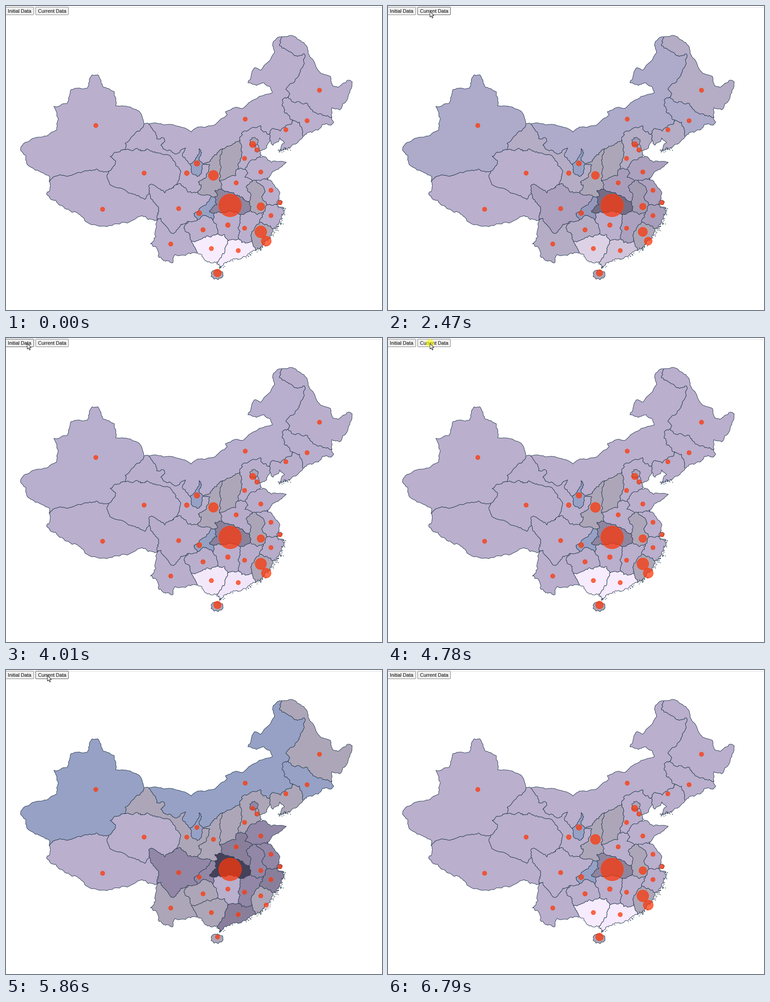
A matplotlib script that plays this animation: 833 px wide and 673 px high, repeating every 7.48 s.

```python
import numpy as np
import matplotlib.pyplot as plt
from matplotlib.animation import FuncAnimation
from matplotlib.colors import to_rgb
from matplotlib.patches import Circle, FancyBboxPatch, Polygon

W, H, DPI = 833, 673, 64
PX = 72 / DPI
LOOP, STEP = 7480, 40
LINE = "#2c4055"
LILAC, BLUE, GREY = "#baafcd", "#96a1c5", "#ada6b8"
MAUVE, DUSK, NIGHT, PALE = "#9287a6", "#897f9b", "#464059", "#f7ebfe"
BASE = 4.7  # resting bubble radius

rng = np.random.default_rng(7)
plt.rcParams["toolbar"] = "None"
fig = plt.figure(figsize=(W / DPI, H / DPI), dpi=DPI, facecolor="white")
ax = fig.add_axes([0, 0, 1, 1])
ax.set(xlim=(0, W), ylim=(H, 0))
ax.axis("off")

# ---- map: corners where borders meet, and a few bends between two corners ----
CORNERS = dict(
    a=(96, 389), b=(228, 366), c=(264, 318), d=(306, 261), e=(316, 261), f=(611, 68),
    g=(722, 246), h=(658, 289), i=(634, 252), j=(624, 202), k=(582, 284), l=(585, 297),
    m=(518, 297), n=(480, 316), o=(438, 350), p=(408, 351), q=(366, 405), r=(318, 415),
    s=(335, 474), t=(425, 413), u=(455, 422), v=(463, 423), w=(484, 411), x=(473, 386),
    y=(513, 361), z=(530, 362), A=(562, 334), B=(546, 388), C=(554, 386), D=(581, 385),
    E=(537, 433), F=(541, 452), G=(519, 462), H=(461, 459), I=(458, 474), J=(424, 474),
    K=(403, 477), L=(411, 522), M=(424, 547), N=(467, 505), O=(491, 521), P=(516, 516),
    Q=(467, 567), R=(545, 521), S=(562, 478), T=(570, 457), U=(579, 440), V=(599, 439),
    W=(592, 493), X=(554, 541), Y=(428, 316))
borders = {}


def roughen(pts, amp):
    """Midpoint displacement down to steps of about three pixels."""
    while True:
        d = np.diff(pts, axis=0)
        size = np.hypot(*d.T)
        if size.mean() < 3.5:
            return pts
        shift = np.clip(rng.normal(0, amp, len(d)), -2 / size, 2 / size)
        out = np.empty((2 * len(pts) - 1, 2))
        out[::2] = pts
        out[1::2] = (pts[:-1] + pts[1:]) / 2 + np.c_[-d[:, 1], d[:, 0]] * shift[:, None]
        pts = out


def border(ends, *xy, amp=0.16):
    bends = np.reshape(xy, (-1, 2))
    pts = np.vstack([CORNERS[ends[0]], bends, CORNERS[ends[1]]]).astype(float)
    borders[ends] = roughen(pts, amp)


# outer edge
border("ad", 97, 378, 72, 365, 47, 351, 44, 331, 32, 318, 42, 302, 66, 291, 96, 284,
       112, 275, 116, 250, 106, 222, 135, 216, 144, 185, 180, 182, 190, 153, 203, 152,
       214, 178, 240, 190, 243, 221, 279, 226, 298, 237, amp=0.1)
border("ef", 360, 262, 385, 267, 410, 279, 424, 268, 463, 263, 490, 241, 486, 234,
       511, 224, 526, 226, 561, 200, 590, 192, 586, 180, 572, 170, 555, 176, 536, 170,
       550, 137, 565, 142, 595, 103, 591, 82, 601, 70, amp=0.07)
border("fg", 630, 65, 660, 81, 673, 112, 692, 143, 719, 156, 724, 177, 735, 180,
       758, 164, 767, 168, 757, 205, 739, 230, 722, 225, amp=0.1)
border("gh", 722, 263, 709, 260, 693, 274, 668, 280)
border("hl", 637, 306, 605, 322, 617, 302, 606, 292, 592, 308)
border("lA", 578, 312, 559, 319, 566, 331)
border("AD", 575, 334, 588, 346, 621, 346, 590, 367, 578, 381)
border("DV", 590, 391, 607, 414, 603, 429, 611, 435)
border("VW", 616, 447, 611, 470, 600, 485, amp=0.3)
border("WX", 585, 510, 567, 532, amp=0.3)
border("XQ", 535, 551, 490, 566, 473, 581, amp=0.22)
border("QM", 447, 567, 431, 549)
border("Ms", 400, 550, 375, 550, 368, 569, 349, 564, 337, 553, 333, 534, 320, 527,
       332, 510)
border("sa", 315, 473, 302, 464, 263, 479, 217, 487, 176, 477, 160, 460, 138, 450,
       110, 430, 98, 426, 90, 417, 97, 405)

# inner borders; pairs not listed run straight
border("ab", 104, 379, 145, 375, 200, 361, amp=0.1)
border("bc", 243, 344, 231, 333)
border("cd", 264, 304, 296, 277, amp=0.1)
border("br", 224, 374, 230, 395, 278, 415, 308, 428, amp=0.1)
border("rq", 318, 396, 330, 398, 352, 414)
border("rs", 338, 450)
border("cq", 285, 317, 300, 321, 312, 316, 360, 330, 385, 362, 379, 394)
border("ep", 334, 294, 347, 291, 352, 300, 343, 308, 351, 317, 379, 327, 398, 314,
       391, 332)
border("po", 414, 372, 425, 377, 433, 366)
border("pY", 417, 343)
border("Yo", 433, 324, 428, 338)
border("ot", 452, 352, 442, 381, 426, 390, 433, 396)
border("qt", 384, 393, 403, 412)
border("on", 456, 338)
border("mk", 523, 280, 564, 265, 568, 276)
border("ki", 592, 271, 608, 277, 632, 262)
border("ij", 616, 234, 612, 208)
border("jf", 629, 195, 620, 184, 648, 155, 654, 139, 661, 106, 640, 110, 619, 95, 606, 88)
border("jg", 637, 213, 668, 216, 675, 228, 702, 243)
border("ih", 650, 257)
border("nx", 474, 345)
border("my", 521, 318)
border("zA", 540, 344)
border("yx", 508, 376)
border("zB", 536, 370, 529, 379)
border("BE", 532, 400, 541, 414)
border("CU", 574, 410, 567, 421)
border("TF", 555, 461)
border("wE", 517, 420)
border("GH", 492, 453, 475, 458)
border("vw", 469, 418, 463, 408, 474, 405)
border("Hv", 451, 453, 467, 440)
border("uJ", 443, 440, 416, 460)
border("JI", 437, 463)
border("sK", 343, 470, 371, 504, 388, 483)
border("KL", 394, 492, 408, 506)
border("LM", 418, 533)
border("LN", 445, 509)
border("IN", 466, 483)
border("NO", 484, 506)
border("OQ", 485, 541)
border("GP", 514, 490)
border("PR", 522, 524)
border("RS", 542, 508)


def edge(ends):
    if ends[::-1] in borders:
        return borders[ends[::-1]][::-1]
    if ends not in borders:
        border(ends)
    return borders[ends]


shapes, bubbles = [], []


def bubble(x, y, r):
    c = ax.add_patch(Circle((x, y), r, fc=(0.99, 0.21, 0.03, 0.73),
                            ec=(1, 0.23, 0.03, 0.85), lw=PX, zorder=4))
    bubbles.append((c, r, r if r > 20 else BASE))


def area(pts, before, after, x, y, r=BASE):
    poly = ax.add_patch(Polygon(pts, ec=LINE, lw=PX, joinstyle="round", zorder=2))
    shapes.append((poly, np.array(to_rgb(before)), np.array(to_rgb(after))))
    bubble(x, y, r)


def province(ring, *args):
    area(np.vstack([edge(p + q) for p, q in zip(ring, ring[1:] + ring[0])]), *args)


def blob(cx, cy, rx, ry, *args):
    a = np.linspace(0, 2 * np.pi, 10)
    area(roughen(np.c_[cx + rx * np.cos(a), cy + ry * np.sin(a)], 0.18), *args)


province("adcb", LILAC, BLUE, 199, 264.5)
province("abrs", LILAC, LILAC, 214, 450)
province("bcqr", LILAC, LILAC, 306, 370)
province("depotqc", LILAC, GREY, 400.5, 370, 5.3)
province("efjikmnoYp", LILAC, BLUE, 530, 250.5)
province("fgj", LILAC, GREY, 694.5, 186.5)
province("ghij", LILAC, BLUE, 667, 254)
province("hlki", LILAC, GREY, 620, 274)
province("lAzymk", LILAC, GREY, 528.5, 337.5)
area(edge("nx"), GREY, GREY, 0, -50)if False else None
province("nxwvuto", GREY, GREY, 459.5, 375, 11)
province("Yop", BLUE, BLUE, 423, 348.5, 6.2)
province("ADCBz", LILAC, MAUVE, 564.5, 367.5)
province("yzBEwx", LILAC, DUSK, 510, 391.5)
province("DVUC", LILAC, MAUVE, 587, 408)
province("BCUTFE", GREY, MAUVE, 564.5, 444, 8.5)
province("wEFGHv", "#8f859f", NIGHT, 496.5, 441.5, 25)
province("uvHIJ", BLUE, MAUVE, 428, 458.5, 5.7)
province("rqtuJKs", LILAC, MAUVE, 382.5, 448.5)
province("VWSTU", LILAC, DUSK, 587, 464)
province("WXRS", GREY, GREY, 564.5, 500, 13)
province("GFTSRP", LILAC, MAUVE, 528.5, 492)
province("HGPONI", LILAC, LILAC, 491.5, 485, 5.2)
province("JINLK", LILAC, GREY, 436.5, 495.5, 4.9)
province("sKLM", LILAC, GREY, 365, 527)
province("LNOQM", PALE, GREY, 455, 537)
province("OPRXQ", PALE, DUSK, 514.5, 541.5)
blob(549, 300, 9.5, 9.5, GREY, MAUVE, 546.5, 306.5, 7)
blob(556, 315, 5, 9, LILAC, GREY, 556, 318.5)
blob(606, 435, 6, 5, LILAC, MAUVE, 607, 435.5)
blob(467, 595, 13.5, 11, GREY, GREY, 468.5, 591, 8.5)
bubble(576.5, 520.5, 11)
halo = ax.add_patch(Circle((576.5, 520.5), 11, fc="#e3dfe9", ec="none", zorder=1))

# this one has no bubble of its own
middle = np.vstack([edge(s) for s in ("my", "yx", "xn", "nm")])
ax.add_patch(Polygon(middle, fc=GREY, ec=LINE, lw=PX, joinstyle="round", zorder=2))

# islets strewn along the coast
islets = [rng.choice(edge(s), n) + rng.normal(1.5, 2, (n, 2))
          for s, n in (("VW", 40), ("WX", 24), ("XQ", 18))]
islets.append(rng.normal((616, 318), (6, 2.5), (20, 2)))
ax.plot(*np.vstack(islets).T, "o", ms=1.8 * PX, mfc=LINE, mec="none", zorder=3)

# ---- buttons and pointer ----
ax.plot([0, W], [2.5, 2.5], color="#dedee3", lw=PX, zorder=5)


def button(x0, x1, label):
    box = FancyBboxPatch((x0, 2.5), x1 - x0, 17, boxstyle="round,pad=0,rounding_size=2",
                         fc="#efefef", ec="#858585", lw=PX, zorder=6)
    ax.add_patch(box)
    ax.text((x0 + x1) / 2, 15, label, family="Liberation Sans", size=10.85 * PX,
            ha="center", va="baseline", color="black", zorder=7)
    return box


left = button(-1.5, 61.5, "Initial Data")
right = button(65.5, 138.5, "Current Data")
glow = ax.add_patch(Circle((0, 0), 9, fc="#ffff00", ec="none", alpha=0.6, zorder=8))
ARROW = np.array([(0, 0), (0, 12.5), (2.9, 9.9), (4.9, 14.6), (6.9, 13.7), (4.9, 9.2),
                  (8.8, 9.2)])
arrow = ax.add_patch(Polygon(ARROW, fc="white", ec="black", lw=0.9 * PX, zorder=9))

# ---- timing, in ms ----
TICK, FIRST = 77.2, 65                  # screen refresh
STALLS, HOLD = (2300, 3760, 5230, 6465), 155
CLICKS, GLOW, LAG = (1225, 2075, 3430, 4770, 6130), 150, 115
FADE = 600
ON_LEFT, ON_RIGHT = (47, 12), (93, 12)
MOVES = [(65, 760, (78, 20)), (760, 910, (51, 11)), (1600, 1990, ON_RIGHT),
         (2980, 3080, ON_LEFT), (4120, 4460, ON_RIGHT), (5830, 6080, ON_LEFT)]


def cubic(u):
    u = min(max(u, 0), 1)
    return 4 * u ** 3 if u < 0.5 else 1 - (2 - 2 * u) ** 3 / 2


def clock(i):
    """Time of the last screen refresh, held during the short stalls."""
    t = FIRST + TICK * np.floor((i * STEP + 24 - FIRST) / TICK)
    return next((s + 7 for s in STALLS if s <= t < s + HOLD), t)


def pointer(t):
    pos = np.array([652.0, 596.0])
    for t0, t1, goal in MOVES:
        u = min(max((t - t0) / (t1 - t0), 0), 1)
        pos = pos + (np.array(goal) - pos) * u * u * (3 - 2 * u)
    return pos


def update(i):
    t = clock(i)
    # the first click changes nothing; the others go there and back in turn
    p = sum((-1) ** k * cubic((t - c - LAG) / FADE) for k, c in enumerate(CLICKS[1:]))
    for poly, a, b in shapes:
        poly.set_facecolor(np.clip(a + (b - a) * p, 0, 1))
    for c, r0, r1 in bubbles:
        c.set_radius(r0 + (r1 - r0) * p)
    halo.set_alpha(min(max(p, 0), 1) ** 4)

    x, y = pointer(t)
    shown = 60 < t < 6400
    arrow.set_visible(shown)
    arrow.set_xy(ARROW + (x, y))
    pressed = any(c <= t < c + GLOW for c in CLICKS)
    glow.set_visible(pressed)
    glow.center = x, 11.5
    over = shown and y < 20 and not pressed
    left.set_edgecolor("#555555" if over and x < 63 else "#858585")
    right.set_edgecolor("#555555" if over and 64 < x < 140 else "#858585")
    return [arrow, glow, halo, left, right]


anim = FuncAnimation(fig, update, frames=LOOP // STEP, interval=STEP, repeat=True,
                     repeat_delay=0, blit=False)
plt.show()
```
